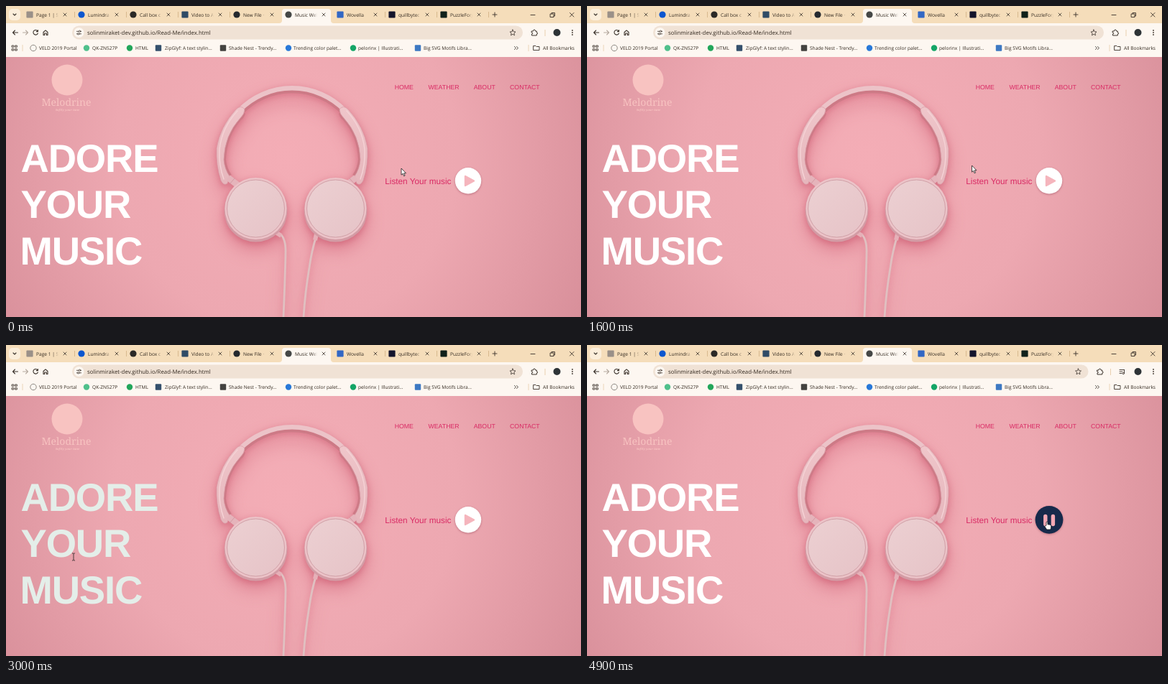
These frames come from a looping animation (800x433 px, 5 s). An HTML page:

```html
<!DOCTYPE html>
<html lang="en">
<head>
<meta charset="utf-8">
<title>Music Website</title>
<style>
html, body { margin: 0; width: 100%; height: 100%; overflow: hidden; background: #eca5b1; }
svg { display: block; width: 100vw; height: 100vh; }
text { text-rendering: geometricPrecision; white-space: pre; }
.ui { font: 6.6px "Open Sans", "Noto Sans", sans-serif; fill: #33291f; }
.url { font-size: 7.85px; }
.page { font: 8.75px "Liberation Sans", Arial, sans-serif; fill: #d92a64; }
.listen { font-size: 11.75px; }
#title { font-size: 54.5px; font-weight: bold; letter-spacing: -1.2px; }
.brand { font: 14px "Noto Serif", serif; fill: #f8c3c1; text-anchor: middle; }
.tag { font-size: 4.1px; font-style: italic; font-weight: bold; }
.line { fill: none; stroke: #3b332c; stroke-linecap: round; stroke-linejoin: round; }
.phones { filter: drop-shadow(0 3px 4px rgba(196, 74, 98, .45)) drop-shadow(0 11px 11px rgba(200, 80, 104, .42)); }
</style>
</head>
<body>
<svg viewBox="0 0 800 433">
  <defs>
    <radialGradient id="wall" gradientUnits="userSpaceOnUse" cx="390" cy="210" r="480">
      <stop offset="0" stop-color="#f4adb6"/>
      <stop offset=".5" stop-color="#eda8b1"/>
      <stop offset="1" stop-color="#d78e99"/>
    </radialGradient>
    <linearGradient id="fade" gradientUnits="userSpaceOnUse" x1="33" x2="40">
      <stop stop-color="#33291f"/>
      <stop offset="1" stop-color="#33291f" stop-opacity="0"/>
    </linearGradient>
    <linearGradient id="band" x2="0" y2="1">
      <stop stop-color="#efc6ca"/>
      <stop offset="1" stop-color="#e6b6bc"/>
    </linearGradient>
    <linearGradient id="face" x2="1" y2="1">
      <stop stop-color="#ecd0d2"/>
      <stop offset="1" stop-color="#e6c3c7"/>
    </linearGradient>
    <g id="yoke">
      <path stroke="#cd7a86" stroke-width="4" d="M331 149Q330 154 326 157Q305 181 304 214Q305 226 312 236"/>
      <path fill="url(#band)" stroke="#d99aa5" stroke-width=".7" d="M320 144Q327 137 332 144Q332 150 326 156Q304 180 303 214Q304 227 311 237L308 247Q303 251 299 243Q292 222 293 198Q298 168 320 144Z"/>
      <path class="line" style="stroke:#f5d3d6" stroke-width="1.4" d="M322 146Q300 170 297 200Q296 222 303 241"/>
      <path stroke="#e5b4bb" stroke-width="9" d="M309 239L322 249"/>
      <path stroke="#cf929c" stroke-width=".8" d="M318 240L311 248"/>
    </g>
    <g id="cup">
      <ellipse cy="3" rx="44" ry="43.5" fill="#d39ca5"/>
      <circle r="43" fill="#ecc3c8"/>
      <circle r="40" fill="url(#face)" stroke="#d0a0a7"/>
    </g>
  </defs>

  <rect width="800" height="433" fill="url(#wall)"/>
  <g class="phones" fill="none">
    <path stroke="#e0c0c1" stroke-width="2.8" d="M379 316Q390 321 389 346Q388 385 386 433M432 319Q425 342 422 364Q416 400 414 433"/>
    <path stroke="#e6b0b8" stroke-width="6" d="M375 315L383 320M432 317L430 326"/>
    <path stroke="#cd7a86" stroke-width="5" d="M328 148.5A97.5 97.5 0 0 1 468 148.5"/>
    <path stroke="#ecc3c8" stroke-width="6.5" d="M325 145A102 102 0 0 1 471 145"/>
    <use href="#yoke"/>
    <use href="#yoke" transform="matrix(-1 0 0 1 796 0)"/>
    <use href="#cup" x="347.5" y="282"/>
    <use href="#cup" x="458.5" y="282"/>
  </g>

  <circle cx="85" cy="103" r="21.5" fill="#f8c3c1"/>
  <text class="brand" x="84" y="139">Melodrine</text>
  <text class="brand tag" x="85.5" y="146">Softly your tune</text>
  <g class="page">
    <text x="540.7" y="116">HOME</text>
    <text x="587.5" y="116">WEATHER</text>
    <text x="650.7" y="116">ABOUT</text>
    <text x="701" y="116">CONTACT</text>
    <text class="listen" x="527.3" y="248">Listen Your music</text>
    <g id="title">
      <text x="20.5" y="230.7">ADORE</text>
      <text x="20.5" y="295.2">YOUR</text>
      <text x="19.5" y="359.7">MUSIC</text>
    </g>
  </g>
  <g style="filter:drop-shadow(0 1px 1.5px rgba(120,40,60,.4))">
    <circle id="disc" cx="643" cy="243.3"/>
  </g>
  <path id="play" d="M639 237V250L651 243.5Z" fill="#f5b5bd" stroke="#f5b5bd" stroke-width="2.4" stroke-linejoin="round"/>
  <path id="pause" d="M637.8 238.5V249.5M648.4 238.5V249.5" stroke="#f5a9b4" stroke-width="5.4" stroke-linecap="round"/>

  <rect width="800" height="71" fill="#fdf7f1"/>
  <path fill="#f5ddba" d="M0 0H800V24H456Q452 24 452 20V8Q452 4 448 4H388Q384 4 384 8V20Q384 24 380 24H0Z"/>
  <rect x="4" y="4" width="16" height="16" rx="5" fill="#fbeedb"/>
  <path class="line" stroke-width="1.1" d="M10 11L12 13L14 11"/>
  <g id="tabs" class="ui"></g>
  <path class="line" stroke-width=".9" d="M677 12H683M680 9V15M730 12.5H736M784.5 9.5L790 15M790 9.5L784.5 15M757.5 11H762V15.5H757.5ZM759 11V9.5H763.5V14H762"/>

  <rect id="bar" x="92" y="27.5" height="19" rx="9.5" fill="#f0e2d5"/>
  <circle cx="101.5" cy="37" r="7" fill="#fdf7f1"/>
  <path class="line" stroke-width=".9" d="M98.5 35.3H101M104 35.3H104.5M98.5 38.8H99M102 38.8H104.5"/>
  <circle class="line" stroke-width=".8" cx="102.5" cy="35.3" r="1.2"/>
  <circle class="line" stroke-width=".8" cx="100.5" cy="38.8" r="1.2"/>
  <text class="ui url" x="113" y="39.8">solinmiraket-dev.github.io/Read-Me/index.html</text>
  <path class="line" stroke-width="1.1" d="M16.5 37H9.5M12.5 34L9.5 37L12.5 40M44 35A3.3 3.3 0 1 0 44.3 38M44.4 33.5V35.6H42.2M52 36.5L55 33.8L58 36.5V40.5H56.3V38H53.7V40.5H52Z"/>
  <path class="line" style="stroke:#b5aaa0" stroke-width="1.1" d="M23.5 37H30.5M27.5 34L30.5 37L27.5 40"/>
  <g id="tools">
    <path class="line" stroke-width=".8" d="M705 33L706.2 35.7L709 36L706.9 37.9L707.5 40.8L705 39.3L702.5 40.8L703.1 37.9L701 36L703.8 35.7Z"/>
    <path class="line" stroke-width="1" d="M731.5 35H733.5Q733.5 33 735 33Q736.5 33 736.5 35H738.3V37Q739.8 37.2 739.8 38T738.3 39V41H731.5V39Q733 38.8 733 38T731.5 37Z"/>
    <path stroke="#e9cfae" d="M750 33V42"/>
  </g>
  <g id="media" class="line" stroke-width=".9">
    <path d="M741 34.5H747.5M741 37H745M741 39.5H744M747.5 34.5V39"/>
    <circle cx="746.3" cy="39.5" r="1.2"/>
  </g>
  <circle cx="766.5" cy="37" r="5" fill="#2d3336"/>
  <g fill="#3b332c">
    <circle cx="788" cy="34" r=".9"/><circle cx="788" cy="37" r=".9"/><circle cx="788" cy="40" r=".9"/>
  </g>
  <path class="line" stroke-width=".9" d="M8.5 55H10.8V57.3H8.5ZM13 55H15.3V57.3H13ZM8.5 59.7H10.8V62H8.5ZM13 59.7H15.3V62H13Z"/>
  <path stroke="#ecd5b8" d="M23 54V63M727 54V63"/>
  <g id="marks" class="ui">
    <text x="747" y="61">All Bookmarks</text>
  </g>
  <path class="line" stroke-width=".9" d="M707.5 56.5L709.5 58.5L707.5 60.5M710.5 56.5L712.5 58.5L710.5 60.5M734 55.5H737L738 56.5H742V61.5H734Z"/>

  <g id="cursor" stroke="#1d1d1d" stroke-width=".8" stroke-linejoin="round">
    <path id="arrow" fill="#fff" d="M0 0V9.2L2.1 7.3L3.6 10.8L5.1 10.1L3.6 6.8H6.5Z"/>
    <path id="beam" fill="none" d="M-2 -5H-.6L0 -4.4L.6 -5H2M0 -4.4V4.4M-2 5H-.6L0 4.4L.6 5H2"/>
    <path id="hand" fill="#fff" d="M-1 5V.6Q0 -.8 1 .6V4Q2 3.2 2.7 4.2Q3.7 3.5 4.3 4.7Q5.5 4.2 5.7 5.5V8Q5.5 9.5 4.7 11H-.3Q-1.6 8.8 -3.2 6.8Q-3.2 5.3 -1.8 6Z"/>
  </g>
</svg>
<script>
const $ = id => document.getElementById(id);

// kind: o = circle, s = square, r = ring
function icon(kind, x, y, color, r = 4.6) {
  if (kind === 's') return `<rect x="${x - r}" y="${y - r}" width="${2 * r}" height="${2 * r}" rx="1" fill="${color}"/>`;
  const paint = kind === 'r' ? `fill="none" stroke="${color}"` : `fill="${color}"`;
  return `<circle cx="${x}" cy="${y}" r="${r}" ${paint}/>`;
}

const tabs = [
  ['s', '#9a9088', 'Page 1 | Start'], ['o', '#0b56cf', 'Lumindra'], ['o', '#2b2926', 'Call box co'],
  ['s', '#2f4b66', 'Video to Any'], ['o', '#25292e', 'New File ·'], ['o', '#454746', 'Music Website'],
  ['s', '#3267c4', 'Wovella'], ['s', '#14142b', 'quillbytecamp'], ['s', '#10211a', 'PuzzleForge']
];
$('tabs').innerHTML = tabs.map(([kind, color, name], i) => {
  const x = 33 + 72 * i, edge = i === 4 || i === 5 ? '' : '<path stroke="#d8b98e" d="M62.5 8V16"/>';
  return icon(kind, x, 12, color) + `<g transform="translate(${x} 0)">
    <text x="9" y="14.6" style="fill:url(#fade)">${name.slice(0, 10)}</text>
    <path class="line" stroke-width=".8" d="M47 10L51 14M51 10L47 14"/>${edge}</g>`;
}).join('');

const marks = [
  [38, 'r', '#8b8781', 46, 'VELD 2019 Portal'], [112, 'o', '#4fc08b', 120, 'QK-ZN527P'],
  [172, 'o', '#22a65a', 180, 'HTML'], [212, 's', '#34506c', 221, 'ZipGlyf: A text stylin...'],
  [302, 's', '#43423f', 310, 'Shade Nest - Trendy...'], [393, 'o', '#2878d8', 400, 'Trending color palet...'],
  [483, 'o', '#13a566', 490, 'pelorinx | Illustrati...'], [573, 's', '#3d78c2', 581, 'Big SVG Motifs Libra...']
];
$('marks').innerHTML += marks.map(([x, kind, color, tx, name]) =>
  icon(kind, x, 58.5, color, 4.2) + `<text x="${tx}" y="61">${name}</text>`).join('');

// pointer stops: time, x, y
const stops = [
  [0, 550, 226], [900, 540, 223], [1600, 535.5, 222], [2300, 536, 218.5], [2450, 536, 218.5],
  [2850, 94, 295], [3100, 94, 295], [3500, 548, 269], [3800, 548, 269], [4300, 640, 246], [5000, 640, 246]
];
function pointer(t) {
  const i = stops.findIndex(s => s[0] > t);
  const [t0, x0, y0] = stops[i - 1], [t1, x1, y1] = stops[i];
  const u = (t - t0) / (t1 - t0), k = u * u * (3 - 2 * u);
  return [x0 + (x1 - x0) * k, y0 + (y1 - y0) * k];
}
const show = (id, on) => $(id).setAttribute('visibility', on ? 'visible' : 'hidden');

function draw(now) {
  const t = Math.floor(now % 5000 / 100) * 100;
  const [x, y] = pointer(t);
  const onTitle = x < 215 && y > 180;
  const onButton = Math.hypot(x - 643, y - 243) < 18;
  const playing = t >= 4600;
  const shift = playing ? 21.5 : 0; // the media button pushes the toolbar left
  $('cursor').setAttribute('transform', `translate(${x} ${y})`);
  show('beam', onTitle);
  show('hand', onButton);
  show('arrow', !onTitle && !onButton);
  $('title').style.fill = onTitle ? '#e4eee9' : '#fff';
  $('disc').setAttribute('fill', onButton ? '#172a4b' : '#fff');
  $('disc').setAttribute('r', onButton ? 19.4 : 18.2);
  show('play', !playing);
  show('pause', playing);
  show('media', playing);
  $('tools').setAttribute('transform', `translate(${-shift} 0)`);
  $('bar').setAttribute('width', 627 - shift);
  requestAnimationFrame(draw);
}
draw(performance.now());
</script>
</body>
</html>
```
